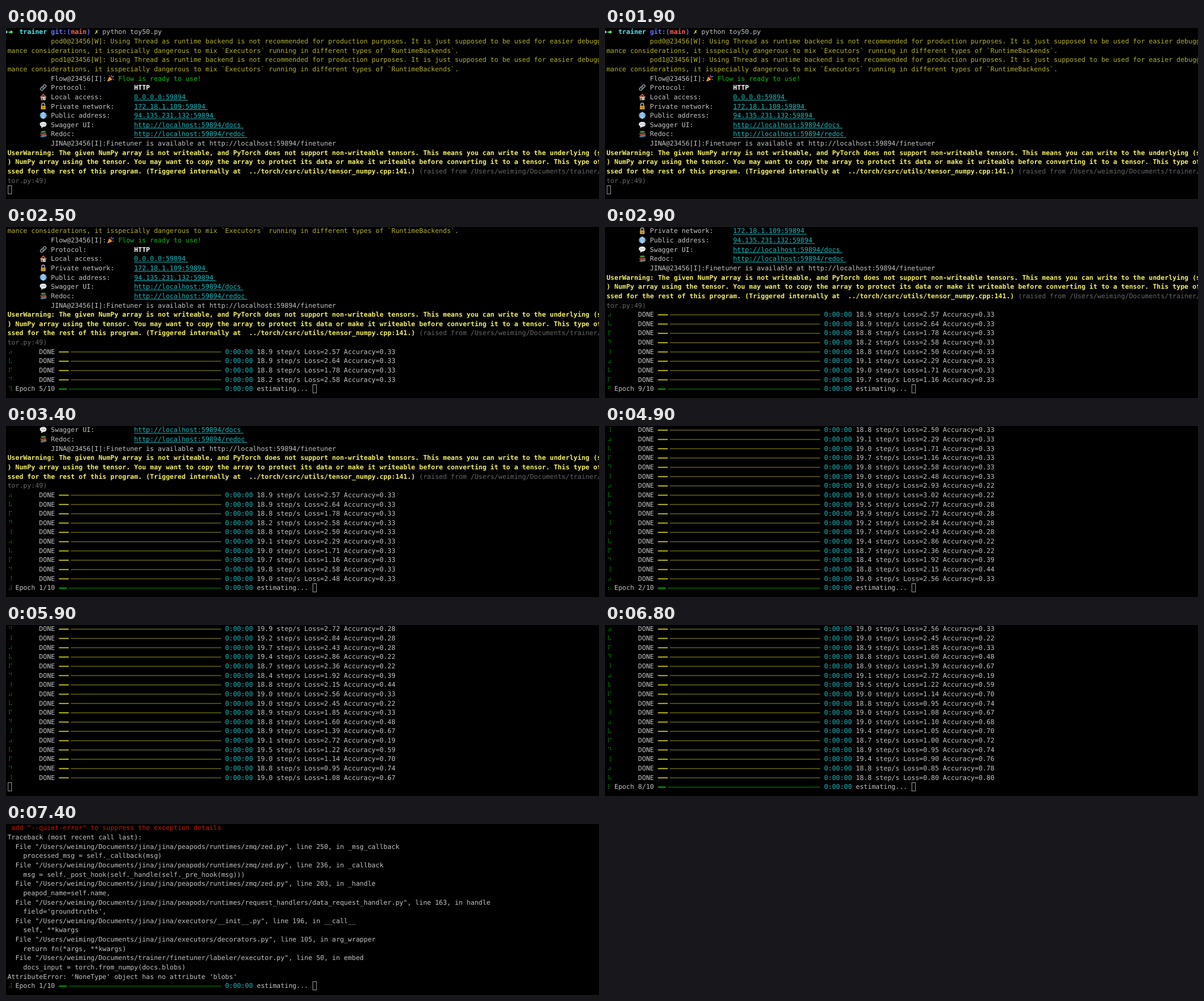
These frames come from a looping animation (1000 by 288 pixels, 7.5 s). An HTML page with a canvas:

```html
<!DOCTYPE html>
<html lang="en">
<head>
<meta charset="utf-8">
<title>Training log</title>
<style>
  html, body { margin: 0; background: #000; overflow: hidden; }
  canvas { display: block; }
</style>
</head>
<body>
<canvas id="screen" width="1000" height="288"></canvas>
<script>
const ctx = document.getElementById('screen').getContext('2d');
const LOOP = 7500, STEP = 100, ROWS = 18;
const LEFT = 2.4, TOP = -1.3, CELL = 6.676, ROW = 15.65, BASELINE = 11.6;
const FONT = '11.09px "DejaVu Sans Mono", monospace';
const GREY = '#c4c4c4', OLIVE = '#b2b02c', YELLOW = '#f4f064', GREEN = '#10bc14',
      CYAN = '#1cbabe', DIM = '#686868', RED = '#c91b00', WHITE = '#fff';
const colX = col => LEFT + col * CELL;

// Every line is a list of drawers that take the top of its row.
const text = (col, string, color = GREY, bold = false) => top => {
  ctx.font = (bold ? 'bold ' : '') + FONT;
  ctx.fillStyle = color;
  [...string].forEach((ch, i) => {
    if (ch !== ' ') ctx.fillText(ch, colX(col + i), top + BASELINE);
  });
};

const line = (from, to, color, weight, y = 8.3) => top => {
  ctx.fillStyle = color;
  ctx.fillRect(colX(from), top + y - weight / 2, (to - from) * CELL, weight);
};

const spinner = index => top => {
  const dots = '⠋⠙⠹⠸⠼⠴⠦⠧⠇⠏'.charCodeAt(index % 10) - 0x2800;
  ctx.fillStyle = '#00bc00';
  for (let i = 0; i < 6; i++) {
    if (dots >> i & 1) ctx.fillRect(i < 3 ? 5.1 : 8.3, top + 3.7 + i % 3 * 2.8, 1.4, 1.4);
  }
};

const cursor = col => top => {
  ctx.strokeStyle = '#949494';
  ctx.lineWidth = 1;
  ctx.strokeRect(Math.ceil(colX(col)) + 0.5, Math.round(top) + 0.5, 6, 14);
};

// Icon layers: colour, path on a 13 x 13 square, stroke width (0 means filled).
const ICONS = {
  prompt: [['#9cc4ec', 'M-3 4L.5 6.8L-3 9.6Z', 0],
           ['#5ff967', 'M1.5 6H5V3.6L9 6.8L5 10V7.8H1.5Z', 0]],
  party: [['#e8b83c', 'M1 12L4 4L9 9Z', 0], ['#d84a3a', 'M3 7L6 10M5 4L9 8', 1.3],
          ['#e85a9a', 'M7 4Q9 3 8 1M10 8L12 9', 1.2], ['#58a8e8', 'M9 5L12 3M4 2h1', 1.3]],
  link: [['#9aa6b0', 'M6 4L8 2Q10 1 11 3Q12 4 11 5L8 8Q7 9 5 7M7 9L5 11Q3 12 2 10Q1 9 2 8L5 5Q6 4 8 6', 1.4]],
  house: [['#dccfbc', 'M2.5 6h8v6h-8Z', 0], ['#b45a40', 'M.5 7L6.5 1L12.5 7L11 8L6.5 3.8L2 8Z', 0],
          ['#80503a', 'M3.5 8h2.5v4h-2.5Z', 0], ['#6aa0c0', 'M7.5 8h2v2h-2Z', 0]],
  lock: [['#a8a8a8', 'M4 6V4Q4 1.5 6.5 1.5T9 4V6', 1.5], ['#c89a3c', 'M2.5 5.8h8v6.2h-8Z', 0],
         ['#80581c', 'M6.5 8v2', 1.3]],
  globe: [['#4a94cc', 'M.8 6.5a5.7 5.7 0 1 0 11.4 0a5.7 5.7 0 1 0 -11.4 0', 0],
          ['#d4eafa', 'M1 6.5h11M6.5 1v11M2 3.7h9M2 9.3h9M6.5 1Q1.5 6.5 6.5 12Q11.5 6.5 6.5 1', 0.8]],
  speech: [['#e8eaec', 'M6.5 1.5C14 1.5 14 10 6.5 10L3 12L3.4 9.4C-1 7 0 1.5 6.5 1.5Z', 0],
           ['#70767c', 'M3.3 5.8h1.2M6 5.8h1.2M8.7 5.8h1.2', 1.2]],
  books: [['#4a8a4c', 'M2 2L9 1L11.5 3.5L4 5Z', 0], ['#b4483c', 'M1.5 5L4 6L11.5 4.5V7L4 8.5L1.5 7Z', 0],
          ['#c0a050', 'M2 8L4 9L12 7.5V9L4 10.5Z', 0], ['#3c70a0', 'M1.5 9.5L4 10.5L12 9V11L4 12.5L1.5 11Z', 0]]
};

const icon = (col, name) => top => {
  ctx.save();
  ctx.translate(colX(col) + 0.5, top + 1.2);
  for (const [color, path, weight] of ICONS[name]) {
    ctx.fillStyle = ctx.strokeStyle = color;
    ctx.lineWidth = weight;
    weight ? ctx.stroke(new Path2D(path)) : ctx.fill(new Path2D(path));
  }
  ctx.restore();
};

const podWarning = pod => [
  [text(11, pod + '@23456[W]: Using Thread as runtime backend is not recommended for production purposes. It is just supposed to be used for easier debugging', OLIVE)],
  [text(0, 'mance considerations, it isspecially dangerous to mix `Executors` running in different types of `RuntimeBackends`.', OLIVE)]
];
const endpoint = (name, label, url) => [
  icon(8, name), text(11, label), text(32, url, CYAN),
  line(32, 32.6 + url.length, CYAN, 1, 13.5)
];

const triggered = 'ssed for the rest of this program. (Triggered internally at  ../torch/csrc/utils/tensor_numpy.cpp:141.) ';
const intro = [
  [icon(0, 'prompt'), text(3, 'trainer', '#4ce8ec', true), text(11, 'git:(', '#6871ff', true),
   text(16, 'main', '#ff5f55', true), text(20, ')', '#6871ff', true), text(22, '✗', YELLOW, true),
   text(24, 'python toy50.py')],
  ...podWarning('pod0'),
  ...podWarning('pod1'),
  [text(11, 'Flow@23456[I]:'), icon(25, 'party'), text(28, 'Flow is ready to use!', GREEN)],
  [icon(8, 'link'), text(11, 'Protocol:'), text(32, 'HTTP', WHITE, true)],
  endpoint('house', 'Local access:', '0.0.0.0:59894'),
  endpoint('lock', 'Private network:', '172.18.1.109:59894'),
  endpoint('globe', 'Public address:', '94.135.231.132:59894'),
  endpoint('speech', 'Swagger UI:', 'http://localhost:59894/docs'),
  endpoint('books', 'Redoc:', 'http://localhost:59894/redoc'),
  [text(11, 'JINA@23456[I]:Finetuner is available at http://localhost:59894/finetuner')],
  [text(0, 'UserWarning: The given NumPy array is not writeable, and PyTorch does not support non-writeable tensors. This means you can write to the underlying (supp', YELLOW, true)],
  [text(0, ') NumPy array using the tensor. You may want to copy the array to protect its data or make it writeable before converting it to a tensor. This type of', YELLOW, true)],
  [text(0, triggered, YELLOW, true),
   text(triggered.length, '(raised from /Users/weiming/Documents/trainer/', DIM)],
  [text(0, 'tor.py:49)', DIM)]
];

// Speed, loss and accuracy of each finished epoch.
const results = `18.9 2.57 0.33,18.9 2.64 0.33,18.8 1.78 0.33,18.2 2.58 0.33,18.8 2.50 0.33
19.1 2.29 0.33,19.0 1.71 0.33,19.7 1.16 0.33,19.8 2.58 0.33,19.0 2.48 0.33
19.0 2.93 0.22,19.0 3.02 0.22,19.5 2.77 0.28,19.9 2.72 0.28,19.2 2.84 0.28
19.7 2.43 0.28,19.4 2.86 0.22,18.7 2.36 0.22,18.4 1.92 0.39,18.8 2.15 0.44
19.0 2.56 0.33,19.0 2.45 0.22,18.9 1.85 0.33,18.8 1.60 0.48,18.9 1.39 0.67
19.1 2.72 0.19,19.5 1.22 0.59,19.0 1.14 0.70,18.8 0.95 0.74,19.0 1.08 0.67`
  .split(/[,\n]/).map(entry => entry.split(' '));
for (let i = 0; i < 10; i++) {
  results.push([19 + 0.4 * Math.sin(i * 2), 1.1 - i * 0.05, 0.68 + i * 0.02]
    .map((value, k) => value.toFixed(k ? 2 : 1)));
}

const done = results.map(([speed, loss, accuracy], i) => [
  spinner(5 + 2 * i), text(8, 'DONE'),
  line(13, 15.5, '#c2bf10', 1.8), line(16, 54, '#625f10', 1.5),
  text(55, '0:00:00', CYAN),
  text(63, `${speed} step/s Loss=${loss} Accuracy=${accuracy}`)
]);

const running = count => [
  spinner(4 + 2 * count), text(2, `Epoch ${count % 10 + 1}/10`.padStart(10)),
  line(13, 15, '#00b400', 1.8), line(15.5, 54, '#006400', 1.5),
  text(55, '0:00:00', CYAN), text(63, 'estimating...'), cursor(77)
];

const call = (path, number, name, code) => [
  [text(2, `File "/Users/weiming/Documents/${path}.py", line ${number}, in ${name}`)],
  [text(4, code)]
];
const zed = 'jina/jina/peapods/runtimes/zmq/zed';
const traceback = [
  [text(1, 'add "--quiet-error" to suppress the exception details', RED)],
  [text(0, 'Traceback (most recent call last):')],
  ...call(zed, 250, '_msg_callback', 'processed_msg = self._callback(msg)'),
  ...call(zed, 236, '_callback', 'msg = self._post_hook(self._handle(self._pre_hook(msg)))'),
  ...call(zed, 203, '_handle', 'peapod_name=self.name,'),
  ...call('jina/jina/peapods/runtimes/request_handlers/data_request_handler', 163, 'handle', "field='groundtruths',"),
  ...call('jina/jina/executors/__init__', 196, '__call__', 'self, **kwargs'),
  ...call('jina/jina/executors/decorators', 105, 'arg_wrapper', 'return fn(*args, **kwargs)'),
  ...call('trainer/finetuner/labeler/executor', 50, 'embed', 'docs_input = torch.from_numpy(docs.blobs)'),
  [text(0, "AttributeError: 'NoneType' object has no attribute 'blobs'")]
];

// Runs of ten epochs, each followed by a short wait at an empty line.
const FIRST_RUN = 2075, RUN = 1325, EPOCH = 100;

function linesAt(time) {
  const elapsed = time - FIRST_RUN;
  if (elapsed < 0) return [...intro, [cursor(0)]];
  const run = Math.floor(elapsed / RUN);
  const epoch = Math.floor(elapsed % RUN / EPOCH);
  const count = run * 10 + Math.min(epoch, 10);
  return [...intro, ...done.slice(0, count), ...(run === 4 ? traceback : []),
          epoch < 10 ? running(count) : [cursor(0)]];
}

let shown = -1;
function frame() {
  const time = Math.floor(performance.now() % LOOP / STEP) * STEP;
  if (time !== shown) {
    shown = time;
    ctx.fillStyle = '#000';
    ctx.fillRect(0, 0, 1000, 288);
    linesAt(time).slice(-ROWS).forEach((drawers, i) =>
      drawers.forEach(draw => draw(TOP + i * ROW)));
  }
  requestAnimationFrame(frame);
}
ctx.textRendering = 'geometricPrecision';
frame();
</script>
</body>
</html>
```
